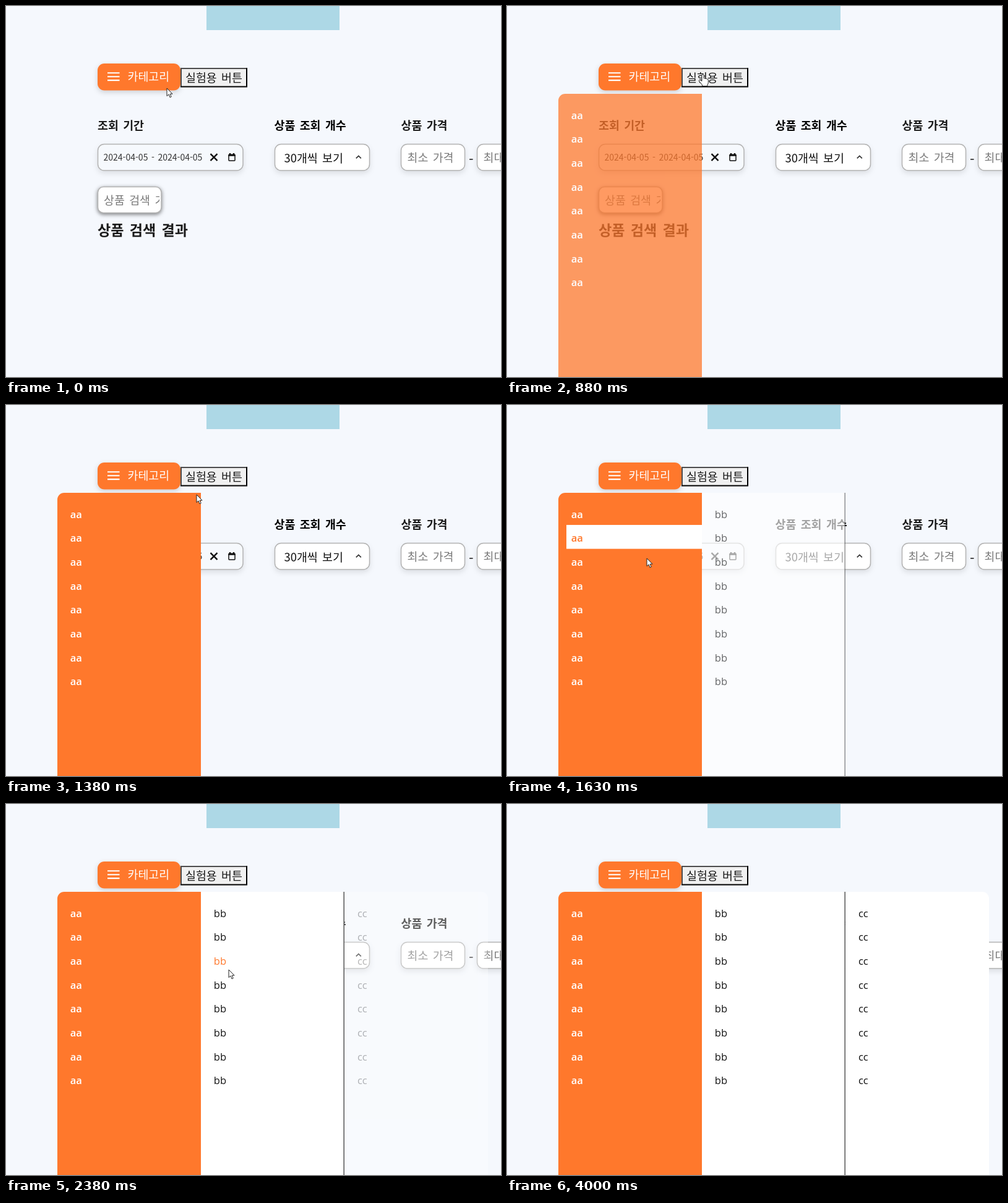
These frames come from a looping animation (800x600 px, 4380 ms). An HTML page:

```html
<!DOCTYPE html>
<html lang="ko">
<head>
<meta charset="utf-8">
<title>카테고리 메뉴</title>
<style>
  html, body { margin: 0; width: 100%; height: 100%; overflow: hidden; background: #f5f8fd; }
  svg { display: block; width: 800px; height: 600px; }
  text { font: 400 18.4px "Noto Sans CJK KR", "Noto Sans CJK", sans-serif; word-spacing: .12em; fill: #1a1a1a; white-space: pre; }
  .label { font-weight: 700; }
  .title { font-weight: 700; font-size: 23.1px; }
  .date { font-size: 14px; fill: #333; }
  .hint { fill: #7b7b7b; }
  .white { fill: #fff; }
  .item { font: 400 16.5px "Open Sans", "Noto Sans", sans-serif; fill: #111; }
  .main { font-weight: 600; fill: #fff; }
  .item.on { fill: #ff782c; }
  .box { fill: #fff; stroke: #b3b3b3; stroke-width: 1.5; filter: drop-shadow(0 4px 4px rgba(0, 0, 0, .1)); }
  .plain { fill: #f6f9fd; }
  .search { filter: drop-shadow(0 2px 3px rgba(0, 0, 0, .5)); }
  .button { fill: #ff782c; filter: drop-shadow(0 3px 4px rgba(0, 0, 0, .16)); }
  .icon { fill: none; stroke: #111; stroke-width: 2; }
  .cursor { fill: #fff; stroke: #222; stroke-width: 1; stroke-linejoin: round; }
</style>
</head>
<body>
<svg viewBox="0 0 800 600">
  <defs><clipPath id="field"><rect x="150" y="293" width="98" height="40"/></clipPath></defs>
  <rect width="800" height="600" fill="#f5f8fd"/>
  <rect x="324" width="215" height="39" fill="#add8e6"/>

  <rect class="button" x="148" y="93" width="134" height="43.5" rx="11"/>
  <path d="M164 108.3h19.5M164 114.2h19.5M164 120.1h19.5" stroke="#fff" stroke-width="2.1"/>
  <text class="white" x="196.5" y="121">카테고리</text>

  <rect x="282" y="100" width="108" height="31.5" fill="#f0f0f0"/>
  <path d="M283 131V101H390" fill="none" stroke="#4c4c4c" stroke-width="2"/>
  <path d="M282 130.5H389V100" fill="none" stroke="#000" stroke-width="2"/>
  <text x="290" y="123.3">실험용 버튼</text>

  <text class="label" x="148" y="200">조회 기간</text>
  <text class="label" x="433.5" y="200" style="fill:#000">상품 조회 개수</text>
  <text class="label" x="638.5" y="200">상품 가격</text>

  <rect class="box plain" x="148.5" y="223.5" width="234.5" height="42.5" rx="10"/>
  <text class="date" x="157.5" y="250">2024-04-05 - 2024-04-05</text>
  <path class="icon" d="M330.5 239.2l11 11m0-11l-11 11" style="stroke-width:2.4"/>
  <rect class="icon" x="360" y="240.3" width="10" height="10" rx="1" style="stroke-width:1.5"/>
  <path class="icon" d="M359.5 241.5h11M362 238v3M368 238v3" style="stroke-width:2.4"/>

  <rect class="box" x="434.5" y="223.5" width="153" height="42.5" rx="10"/>
  <text x="449.5" y="253" style="fill:#111">30개씩 보기</text>
  <path class="icon" d="M565.8 246.4l4-4 4 4" style="stroke-width:1.7;stroke:#333"/>

  <rect class="box" x="638.5" y="223.5" width="103" height="42.5" rx="10"/>
  <text class="hint" x="648.5" y="252">최소 가격</text>
  <path d="M749 248h5.5" stroke="#222" stroke-width="1.6"/>
  <rect class="box" x="761.5" y="223.5" width="103" height="42.5" rx="10"/>
  <text class="hint" x="771.5" y="252">최대 가격</text>

  <rect class="box search" x="148.5" y="292.5" width="102.5" height="42" rx="9"/>
  <text class="hint" x="158" y="321" clip-path="url(#field)">상품 검색 기간</text>
  <text class="title" x="148" y="371">상품 검색 결과</text>

  <g id="panelA">
    <path d="M83 600V153a11 11 0 0 1 11-11H315V600z" fill="#ff782c"/>
    <rect id="mark" x="96" width="219" height="38.65" fill="#fff"/>
  </g>
  <g id="panelB">
    <rect x="315" y="142" width="231" height="458" fill="#fff"/>
    <path d="M546.2 142V600" stroke="#555" stroke-width="1.5"/>
  </g>
  <g id="panelC">
    <path d="M547 142H768a11 11 0 0 1 11 11V600H547z" fill="#fff"/>
  </g>

  <g id="pointer">
    <path id="arrow" class="cursor" d="M0 0V12.6L3 9.9L5 14.8L7.2 13.8L5.1 9.2H9z"/>
    <path id="hand" class="cursor" d="M-1.6 11V1.6Q-1.6 .2 0 .2T1.7 1.6V6.5Q3.2 5.6 4.4 7.1Q6 6.3 6.9 7.9Q8.8 7.5 8.8 9.5V13Q8.8 15.2 7.4 16.6V19H-1V17L-5.8 11.5Q-6.8 9.8-5.3 9.1T-1.6 11z"/>
  </g>
</svg>
<script>
  const LOOP = 4380, STEP = 125, ROWS = 8, ROW_H = 38.65, FIRST_ROW = 155.3, FADE = 320;
  const $ = id => document.getElementById(id);
  const svgNS = "http://www.w3.org/2000/svg";

  function addItems(panel, label, x, extra = "") {
    return Array.from({ length: ROWS }, (_, i) => {
      const item = document.createElementNS(svgNS, "text");
      item.setAttribute("class", "item " + extra);
      item.setAttribute("x", x);
      item.setAttribute("y", 182.7 + i * ROW_H);
      item.textContent = label;
      panel.append(item);
      return item;
    });
  }

  const panels = [
    { node: $("panelA"), start: 733 },
    { node: $("panelB"), start: 1507 },
    { node: $("panelC"), start: 2310 }
  ];
  const mainItems = addItems($("panelA"), "aa", 103.8, "main");
  const subItems = addItems($("panelB"), "bb", 335.8);
  addItems($("panelC"), "cc", 568);

  // step, x, y of the pointer
  const path = [
    [0, 260, 133], [2, 262, 133], [3, 267, 129], [4, 277, 121], [5, 293, 113],
    [6, 308, 110], [8, 325, 111], [9, 328, 113], [10, 326, 118], [11, 308, 145],
    [12, 262, 205], [13, 226, 248], [14, 223, 261], [17, 224, 260], [18, 275, 263],
    [19, 360, 268], [20, 420, 288], [21, 437, 293], [27, 437, 293], [28, 440, 365],
    [29, 444, 500], [30, 446, 610]
  ];
  // first step, hovered row (-1 for none)
  const mainHover = [[0, -1], [13, 1], [14, 2], [19, -1]];
  const subHover = [[0, -1], [19, 2], [20, 3], [28, 5], [29, 7], [30, -1]];

  const active = (table, k) => table.filter(row => row[0] <= k).pop()[1];

  // cubic-bezier(.25, .1, .25, 1)
  function ease(p) {
    if (p <= 0) return 0;
    if (p >= 1) return 1;
    const curve = (a, b, s) => 3 * a * s * (1 - s) ** 2 + 3 * b * s * s * (1 - s) + s ** 3;
    let lo = 0, hi = 1;
    for (let i = 0; i < 24; i++) {
      const mid = (lo + hi) / 2;
      if (curve(.25, .25, mid) < p) lo = mid; else hi = mid;
    }
    return curve(.1, 1, lo);
  }

  function position(k) {
    const i = path.findIndex(p => p[0] >= k);
    if (i < 0) return path[path.length - 1].slice(1);
    if (i === 0) return path[0].slice(1);
    const [k0, x0, y0] = path[i - 1], [k1, x1, y1] = path[i];
    const u = (k - k0) / (k1 - k0);
    return [x0 + (x1 - x0) * u, y0 + (y1 - y0) * u];
  }

  function stepAt(t) {
    const k = Math.floor(t / STEP);
    return t < Math.round(k * STEP / 10) * 10 ? k - 1 : k;
  }

  function draw(k) {
    for (const { node, start } of panels) node.style.opacity = ease((k * STEP - start) / FADE);

    const row = active(mainHover, k), sub = active(subHover, k);
    $("mark").style.display = row < 0 ? "none" : "";
    $("mark").setAttribute("y", FIRST_ROW + row * ROW_H);
    mainItems.forEach((item, i) => item.classList.toggle("on", i === row));
    subItems.forEach((item, i) => item.classList.toggle("on", i === sub));

    const hand = k >= 5 && k <= 10;
    $("hand").style.display = hand ? "" : "none";
    $("arrow").style.display = hand ? "none" : "";
    $("pointer").setAttribute("transform", `translate(${position(k)})`);
  }

  const begin = performance.now();
  let last = 0;
  function tick() {
    const k = stepAt((performance.now() - begin) % LOOP);
    if (k !== last) draw(last = k);
    requestAnimationFrame(tick);
  }
  draw(0);
  requestAnimationFrame(tick);
</script>
</body>
</html>
```
